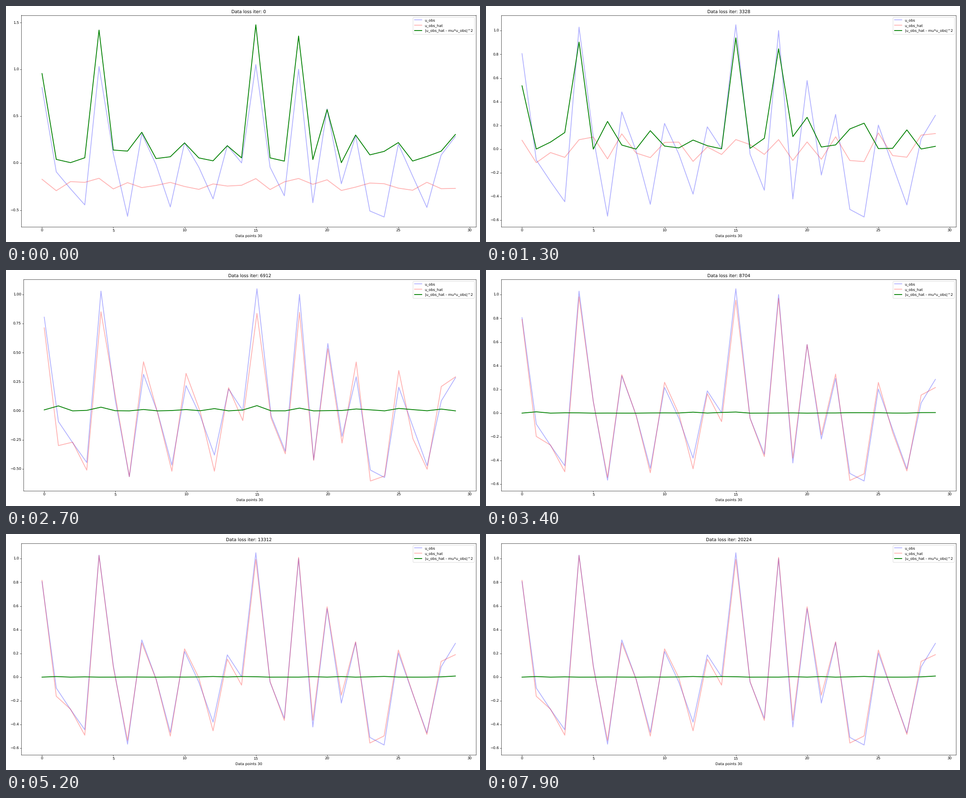
Write a matplotlib script that moves like this. It is 1058 by 529 pixels and loops after 8000 ms.

```python
import numpy as np
import matplotlib.pyplot as plt
from matplotlib.animation import FuncAnimation

plt.rcParams["text.hinting"] = "none"

WIDTH, HEIGHT = 1058, 529
FRAMES, INTERVAL = 80, 100
STEPS_PER_FRAME = 256

# Sample positions in half periods of the fitted wave, and noisy measurements
pos = np.array([
    2.348, -.4, 1.871, 1.711, 2.54, .119, 1.648, .475, 1.013, 1.702,
    .757, -.007, 1.36, .865, 1.052, 2.477, -.057, 1.814, 2.502, 1.277,
    2.242, -.33, .6, 1.56, 1.41, .33, -.26, 1.718, .184, .266])
observed = np.array([
    .806, -.092, -.273, -.444, 1.03, .1, -.566, .314, -.015, -.466,
    .217, -.042, -.38, .188, .003, 1.05, -.043, -.347, 1.001, -.421,
    .579, -.219, .293, -.509, -.573, .203, -.137, -.471, .086, .285])


def wave(amp, growth, shift=0, width=1):
    """Sine over the positions with exponentially changing amplitude."""
    return amp * growth ** pos * np.sin(np.pi * (pos + shift) / width)


# Network output at a few stages of training
untrained = -.2785 + .0375 * pos + .0035 * pos ** 2
emerging = wave(.15, .78, shift=.143, width=1.06)
flat = .008 + .3 * emerging
growing = wave(.49, .9)
close = wave(.36, 1.408)
fitted = wave(.217, 1.85)

TIMES = np.array([8, 13, 19, 27])
SETTLED = 45
DECAY = 5.6
stages = np.array([flat, emerging, growing, close])
slopes = np.gradient(stages, TIMES, axis=0)
slopes[-1] = (fitted - close) / DECAY


def approach(t, span, tau):
    """Exponential ease from 0 at t=0 to 1 at t=span."""
    t = min(t, span)
    return (1 - np.exp(-t / tau)) / (1 - np.exp(-span / tau))


def hermite(t):
    """Smooth cubic path through the training stages."""
    k = np.searchsorted(TIMES, t, side="right") - 1
    h = TIMES[k + 1] - TIMES[k]
    s = (t - TIMES[k]) / h
    return ((1 + 2 * s) * (1 - s) ** 2 * stages[k]
            + s * (1 - s) ** 2 * h * slopes[k]
            + s * s * (3 - 2 * s) * stages[k + 1]
            + s * s * (s - 1) * h * slopes[k + 1])


def predict(t):
    start, end = TIMES[0], TIMES[-1]
    if t < start:
        return untrained + (flat - untrained) * approach(t, start, 2)
    if t < end:
        return hermite(t)
    return close + (fitted - close) * approach(t - end, SETTLED - end, DECAY)


fig, ax = plt.subplots(figsize=(18, 9), dpi=HEIGHT / 9)
x = np.arange(len(pos))
ax.plot(x, observed, "b", lw=2.2, alpha=.3, label="u_obs")
hat_line, = ax.plot(x, untrained, "r", lw=2.2, alpha=.3, label="u_obs_hat")
loss_line, = ax.plot(x, 0 * x, "g", lw=2.2, label="|u_obs_hat - mu*u_obs|^2")
ax.set_xlabel("Data points 30")
ax.legend(loc="upper right")


def update(frame):
    hat = predict(frame)
    hat_line.set_ydata(hat)
    loss_line.set_ydata((hat - observed) ** 2)
    ax.set_title(f"Data loss iter: {frame * STEPS_PER_FRAME}")
    ax.relim()
    ax.autoscale_view()
    # Side margins follow the tick labels; top and bottom stay put
    fig.tight_layout()
    fig.subplots_adjust(top=1 - 20.5 / HEIGHT, bottom=1 - 494.5 / HEIGHT)
    return hat_line, loss_line


anim = FuncAnimation(fig, update, frames=FRAMES, interval=INTERVAL,
                     repeat=True, repeat_delay=0, blit=False)
plt.show()
```
